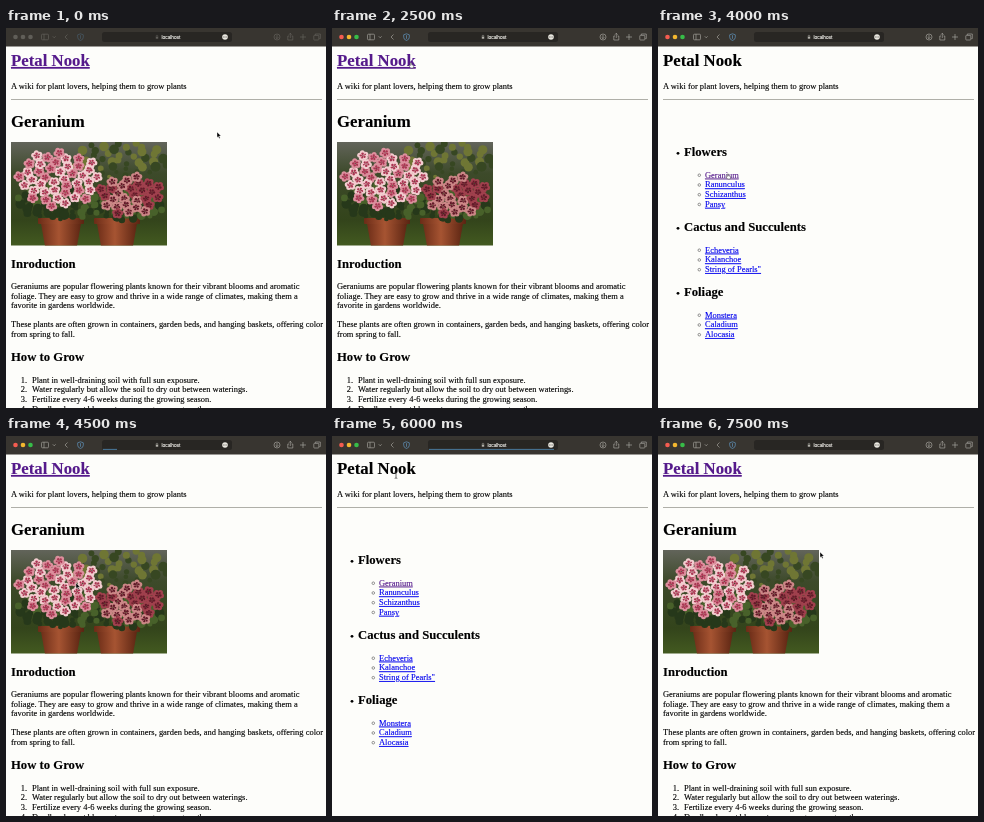
Write an HTML page that moves like this. It is 320 px wide and 380 px high and loops after 8000 ms.

```html
<!DOCTYPE html>
<html lang="en">
<head>
<meta charset="utf-8">
<title>Plant wiki</title>
<style>
  html, body { margin: 0; width: 100%; height: 100%; overflow: hidden; background: #fdfdfa; }
  svg { display: block; width: 320px; height: 380px; }
  text {
    font: 8.46px "Liberation Serif", "Times New Roman", serif;
    color: #000; fill: currentColor; stroke: currentColor; stroke-width: .12; white-space: pre;
  }
  .h1 { font-size: 16.8px; font-weight: bold; }
  .h2 { font-size: 12.7px; font-weight: bold; }
  .link { color: #00e; text-decoration: underline; }
  .seen { color: #551a8b; text-decoration: underline; }
  .url { font: 4.8px "Liberation Sans", Arial, sans-serif; color: #f4f3ee; }
  #icons { fill: none; stroke: #b4b2ac; stroke-width: .6; }
  .idle #icons { opacity: .4; }
  .idle #lights circle { fill: #605e58; }
</style>
</head>
<body>
<svg viewBox="0 0 320 380">
  <defs>
    <linearGradient id="garden" x2="0" y2="1">
      <stop offset="0" stop-color="#62645a"/>
      <stop offset=".3" stop-color="#3d4a2a"/>
      <stop offset=".75" stop-color="#33441b"/>
      <stop offset="1" stop-color="#435a20"/>
    </linearGradient>
    <linearGradient id="clay">
      <stop offset="0" stop-color="#6b2c17"/>
      <stop offset=".45" stop-color="#a65432"/>
      <stop offset="1" stop-color="#5a2412"/>
    </linearGradient>
    <clipPath id="frame"><rect x="5" y="114" width="156" height="103.5"/></clipPath>
  </defs>
  <rect width="320" height="380" fill="#fdfdfa"/>
  <path d="M5 71.5H316" stroke="#a6a6a0" stroke-width=".9"/>
  <g id="page"></g>
  <g id="index"></g>

  <g id="bar">
    <rect width="320" height="18.5" fill="#383530"/>
    <rect x="96" y="4" width="130" height="10" rx="2.5" fill="#282623"/>
    <g id="lights">
      <circle cx="9.5" cy="9" r="2.3" fill="#f45c50"/>
      <circle cx="17" cy="9" r="2.3" fill="#f3b72f"/>
      <circle cx="24.5" cy="9" r="2.3" fill="#37bd48"/>
    </g>
    <g id="icons">
      <rect x="35.5" y="6.2" width="7" height="5.6" rx="1"/>
      <path d="M38 6.2V11.8M46.8 8.3l1.4 1.5 1.4-1.5M61.5 6.5L59 9l2.5 2.5"/>
      <path d="M74.5 5.8l2.8 1v2.4q0 2.4-2.8 3.3-2.8-.9-2.8-3.3V6.8z" stroke="#67a5d6"/>
      <path d="M74.5 7.2v3.6" stroke="#67a5d6"/>
      <rect x="149.8" y="8.7" width="2.4" height="2" fill="#b4b2ac" stroke="none"/>
      <path d="M150.2 8.7V7.6q.8-1 1.6 0v1.1" stroke-width=".5"/>
      <circle cx="271" cy="9" r="3"/>
      <path d="M271 7v3.6M269.6 9.3l1.4 1.4 1.4-1.4"/>
      <path d="M283 8h-1.2v4h5V8h-1.2M284.3 10V5.3M283 6.6l1.3-1.3 1.3 1.3M294 9h6M297 6v6"/>
      <path d="M309.3 7V6h5v4.6h-1"/>
      <rect x="307.8" y="7.4" width="5" height="4.6" rx=".6"/>
    </g>
    <circle cx="219" cy="9" r="2.8" fill="#e9e7e0"/>
    <path d="M217.3 9h3.4" stroke="#383530" stroke-width=".8" stroke-dasharray=".8 .5"/>
    <text class="url" x="155.5" y="10.8">localhost</text>
    <rect id="load" x="97" y="12.9" height=".9" fill="#4d82a8"/>
  </g>

  <g id="cursor">
    <path id="arrow" d="M0 0v5.6l1.3-1.2.9 2 1-.5-.9-1.8h1.7z" fill="#000" stroke="#fff" stroke-width=".4"/>
    <path id="hand" d="M-.6 .4V-2q.5-.6 1 0V-.2l1.7.4q.6.2.5 1l-.4 1.8H-.4l-1.6-2.2q.2-.8 1.4-.4z" fill="#fff" stroke="#444" stroke-width=".5"/>
    <path id="beam" d="M-1.3-3q1.3 0 1.3.8.0-.8 1.3-.8M0-2.2V2.6M-1.3 3.4q1.3 0 1.3-.8 0 .8 1.3.8" fill="none" stroke="#333" stroke-width=".7"/>
  </g>
</svg>
<script>
const $ = id => document.getElementById(id);
const text = (x, y, s, c = '') => `<text x="${x}" y="${y}" class="${c}">${s}</text>`;
const dot = (x, y, r, c) => `<circle cx="${x}" cy="${y}" r="${r}" fill="${c}"/>`;
const lines = (x, y, list) => list.map((s, i) => text(x, y + i * 9.7, s)).join('');
const SITE = 'Petal Nook';
const tagline = text(5, 61, 'A wiki for plant lovers, helping them to grow plants');

let seed = 11;
const rand = () => (seed = seed * 16807 % 2147483647) / 2147483647;

// Scatter count items evenly inside an ellipse.
function scatter(count, cx, cy, rx, ry, draw) {
  let out = '';
  for (let i = 0; i < count; i++) {
    const a = i * 2.4, d = Math.sqrt((i + rand()) / count);
    out += draw(cx + rx * d * Math.cos(a), cy + ry * d * Math.sin(a));
  }
  return out;
}

function flower(x, y, petal, heart) {
  let out = '';
  for (let i = 0; i < 5; i++) {
    const a = i * 1.257 + x, px = Math.cos(a), py = Math.sin(a);
    out += dot(x + 3.3 * px, y + 2.9 * py, 2.5, petal) + dot(x + 2 * px, y + 1.8 * py, 1.3, heart);
  }
  return out;
}

const pot = (x, y) => `<path d="M${x + 2} ${y}h42l-5 ${218 - y}h-32z" fill="url(#clay)"/>
  <rect x="${x}" y="${y}" width="46" height="6" rx="1" fill="url(#clay)"/>`;

function photo() {
  const leaf = (x, y) => dot(x, y, 2 + rand() * 3, rand() < .6 ? '#26381a' : '#48612a');
  const bush = (x, y) => dot(x, y, 2 + rand() * 3, rand() < .5 ? '#6f7634' : '#374722');
  const pale = (x, y) => flower(x, y, rand() < .6 ? '#f3cdd0' : '#dc8f9d', '#a93652');
  const deep = (x, y) => flower(x, y, rand() < .4 ? '#cc8787' : '#a0404d', '#621b29');
  return `<g clip-path="url(#frame)">
    <rect x="5" y="114" width="156" height="104" fill="url(#garden)"/>
    ${scatter(45, 112, 132, 52, 18, bush)}
    ${pot(32, 190)}${pot(88, 190)}
    ${scatter(60, 53, 174, 42, 18, leaf)}${scatter(45, 122, 178, 36, 15, leaf)}
    ${scatter(42, 53, 151, 42, 28, pale)}${scatter(28, 124, 167, 32, 20, deep)}
  </g>`;
}

$('page').innerHTML = text(5, 38, SITE, 'h1 seen') + tagline +
  text(5, 99, 'Geranium', 'h1') + photo() +
  text(5, 240, 'Inroduction', 'h2') +
  lines(5, 261, [
    'Geraniums are popular flowering plants known for their vibrant blooms and aromatic',
    'foliage. They are easy to grow and thrive in a wide range of climates, making them a',
    'favorite in gardens worldwide.']) +
  lines(5, 299.3, [
    'These plants are often grown in containers, garden beds, and hanging baskets, offering color',
    'from spring to fall.']) +
  text(5, 333, 'How to Grow', 'h2') +
  lines(14.8, 354.7, ['1.', '2.', '3.', '4.']) +
  lines(26, 354.7, [
    'Plant in well-draining soil with full sun exposure.',
    'Water regularly but allow the soil to dry out between waterings.',
    'Fertilize every 4-6 weeks during the growing season.',
    'Deadhead spent blooms to encourage more growth.']);

const groups = [
  [128, 'Flowers', 'Geranium', 'Ranunculus', 'Schizanthus', 'Pansy'],
  [203, 'Cactus and Succulents', 'Echeveria', 'Kalanchoe', 'String of Pearls"'],
  [268, 'Foliage', 'Monstera', 'Caladium', 'Alocasia']
];
$('index').innerHTML = text(5, 38, SITE, 'h1') + tagline + groups.map(([y, head, ...items]) =>
  dot(20, y - 2.7, 1.4, '#000') + text(26, y, head, 'h2') + items.map((s, i) => {
    const v = y + 21.5 + i * 9.75;
    return `<circle cx="41.3" cy="${v - 2.3}" r="1.3" fill="none" stroke="#333" stroke-width=".5"/>` +
      text(47, v, s, s === 'Geranium' ? 'seen' : 'link');
  }).join('')).join('');

// One pose per half second: pointer shape, x, y, loading bar width.
const STEP = 500;
const poses = [
  ['arrow', 211, 104], ['arrow', 150, 74], ['hand', 80, 37], ['hand', 79, 37],
  ['hand', 79, 37], ['hand', 79, 37], ['beam', 79, 37, 14], ['arrow', 76, 100],
  ['hand', 70, 148], ['arrow', 70, 147, 14], ['arrow', 70, 147], ['hand', 64, 39],
  ['beam', 64, 39, 125], ['arrow', 74, 126], ['hand', 68, 148], ['arrow', 162, 116]
];
const show = (id, on) => $(id).style.display = on ? '' : 'none';

function draw(now) {
  const step = Math.floor(now % 8000 / STEP);
  const [shape, x, y, load = 0] = poses[step];
  const onIndex = (step >= 6 && step < 9) || (step >= 12 && step < 15);
  show('page', !onIndex);
  show('index', onIndex);
  for (const id of ['arrow', 'hand', 'beam']) show(id, id === shape);
  $('cursor').setAttribute('transform', `translate(${x} ${y})`);
  $('load').setAttribute('width', load);
  $('bar').setAttribute('class', step ? '' : 'idle');
  requestAnimationFrame(() => draw(performance.now()));
}
draw(performance.now());
</script>
</body>
</html>
```
